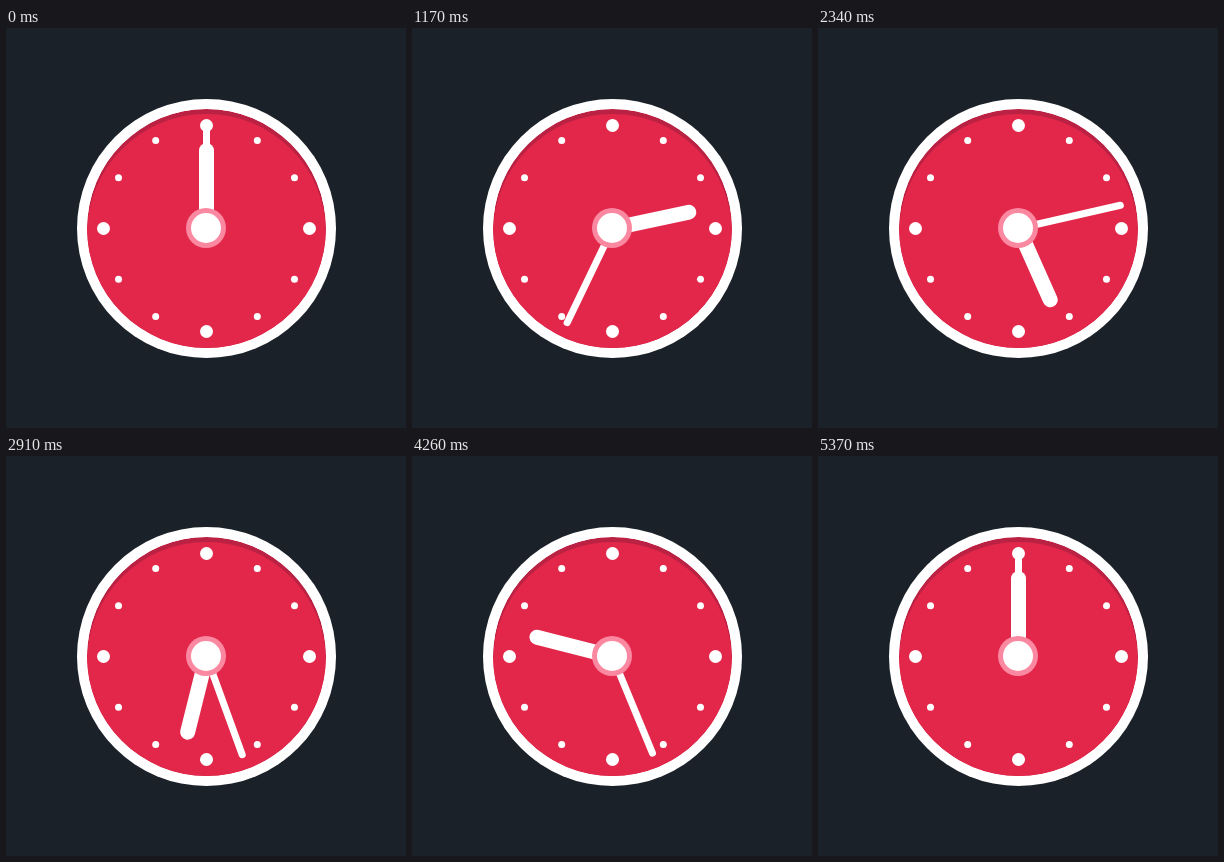
An HTML page for the animation above (5400 ms loop, 400 by 400 pixels).

```html
<!DOCTYPE html>
<html lang="en">
<head>
<meta charset="utf-8">
<title>Clock</title>
<style>
  html, body { margin: 0; width: 100%; height: 100%; overflow: hidden; background: #1a2128; }
  svg { display: block; width: 100vw; height: 100vh; }
  .hand { stroke: #fff; stroke-linecap: round; }
</style>
</head>
<body>
<svg viewBox="0 0 400 400">
  <defs><clipPath id="face"><circle cx="200.5" cy="200.5" r="119.5"/></clipPath></defs>
  <circle cx="200.5" cy="200.5" r="129.5" fill="#fff"/>
  <g clip-path="url(#face)">
    <circle cx="200.5" cy="200.5" r="119.5" fill="#bb2142"/>
    <circle cx="200.5" cy="205.5" r="119.5" fill="#e2274a"/>
  </g>
  <g id="dots" fill="#fff"></g>
  <line id="minute" class="hand" x1="200.5" y1="200.5" x2="200.5" y2="96" stroke-width="7"/>
  <line id="hour" class="hand" x1="200.5" y1="200.5" x2="200.5" y2="122.5" stroke-width="15"/>
  <circle cx="200" cy="200" r="20" fill="#fa88a0"/>
  <circle cx="200" cy="200" r="15" fill="#fff"/>
</svg>
<script>
  const LOOP = 5400, TICK = 30, CENTER = 200.5;

  // [tick, degrees] keys; the minute hand makes a half turn between neighbours
  const minuteKeys = [0, 8, 15, 23, 30, 38, 45, 52, 60, 68, 75, 82, 89, 98, 105, 113, 120,
    128, 135, 143, 150, 158, 165, 173, 179].map((tick, i) => [tick, i * 180]);
  const hourKeys = [[0, 0], [135, 270], [179, 360]];

  const byId = id => document.getElementById(id);
  const minute = byId('minute'), hour = byId('hour');

  for (let i = 0; i < 12; i++) {
    const major = i % 3 === 0;
    const dist = major ? 103 : 101.6;
    const a = i * Math.PI / 6;
    const dot = document.createElementNS('http://www.w3.org/2000/svg', 'circle');
    dot.setAttribute('cx', CENTER + dist * Math.sin(a));
    dot.setAttribute('cy', CENTER - dist * Math.cos(a));
    dot.setAttribute('r', major ? 6.5 : 3.5);
    byId('dots').append(dot);
  }

  function angleAt(keys, tick) {
    const i = keys.findIndex(key => key[0] >= tick);
    if (i === 0) return keys[0][1];
    const [t0, a0] = keys[i - 1], [t1, a1] = keys[i];
    return a0 + (a1 - a0) * (tick - t0) / (t1 - t0);
  }

  function turn(hand, angle) {
    hand.setAttribute('transform', `rotate(${angle} ${CENTER} ${CENTER})`);
  }

  function draw(now) {
    const tick = Math.floor(now % LOOP / TICK);
    turn(minute, angleAt(minuteKeys, tick));
    turn(hour, angleAt(hourKeys, tick));
  }

  function loop() {
    draw(performance.now());
    requestAnimationFrame(loop);
  }
  loop();
</script>
</body>
</html>
```
